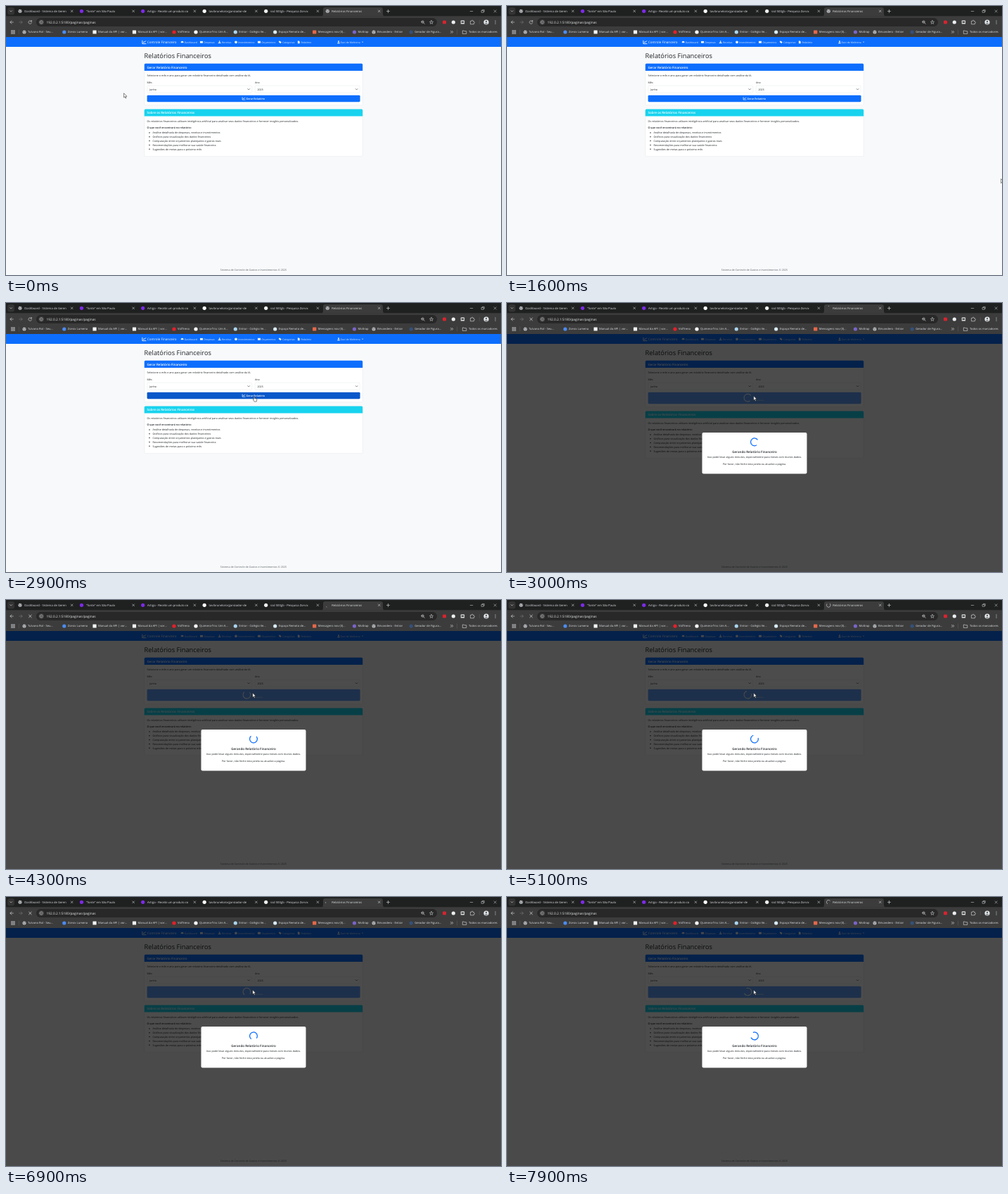
These frames come from a looping animation (704 px wide and 382 px high, 8000 ms). An HTML page:

```html
<!DOCTYPE html>
<html lang="pt-BR">
<head>
<meta charset="utf-8">
<title>Relatórios Financeiros</title>
<style>
html, body { margin: 0; width: 100%; height: 100%; overflow: hidden; background: #f8f9fa; }
svg { display: block; width: 704px; height: 382px; }
text { font-family: "Open Sans", "Noto Sans", sans-serif; text-rendering: geometricPrecision; white-space: pre; }
.line { fill: none; stroke-linecap: round; stroke-linejoin: round; }
</style>
</head>
<body>
<svg id="stage" viewBox="0 0 704 382" xmlns="http://www.w3.org/2000/svg"></svg>
<script>
const BLUE = '#0d6efd', INK = '#212529', PALE = '#dfe1e5';
const LOOP = 8000, STEP = 100, LOADING = 3000;

const text = (x, y, s, size = 3.69, fill = INK, extra = '') =>
  `<text x="${x}" y="${y}" font-size="${size}" fill="${fill}" ${extra}>${s}</text>`;
const rect = (x, y, w, h, fill, r = 0, extra = '') =>
  `<rect x="${x}" y="${y}" width="${w}" height="${h}" fill="${fill}" rx="${r}" ${extra}/>`;
const dot = (x, y, r, fill) => `<circle cx="${x}" cy="${y}" r="${r}" fill="${fill}"/>`;
const line = (d, color = PALE, w = .6, extra = '') =>
  `<path class="line" d="${d}" stroke="${color}" stroke-width="${w}" ${extra}/>`;
const group = (id, body, extra = '') => `<g id="${id}" ${extra}>${body}</g>`;
const at = (x, y, body) => `<g transform="translate(${x} ${y})">${body}</g>`;
const semibold = 'font-weight="600"';
const centered = 'text-anchor="middle"';

const globe = (x, y) => at(x, y, dot(0, 0, 2.5, '#c9cdd1') +
  line('M-1.7-1L-.4-.5L-.8.6L.2 1.7M.4-1.8L1.7-.6L1 .5', '#3c3c3c', .6));
const chart = (x, y, k = 1) => `<g transform="translate(${x} ${y}) scale(${k})">` +
  line('M-2.2-2V2H2.4M-1.2.7L-.1-.6L.7.1L2.1-1.6', '#fff', .75) + '</g>';

function mark(x, y, kind, color) {
  if (kind === 'globe') return globe(x, y);
  return kind === 'square' ? rect(x - 2.6, y - 2.6, 5.2, 5.2, color, .5) : dot(x, y, 2.6, color);
}

function tabStrip() {
  const tabs = [
    [20, 'Dashboard - Sistema de Geren', 'globe'],
    [107.5, '"fonte" em São Paulo', 'dot', '#7d2ae8'],
    [194.7, 'Artigo - Recebi um produto co', 'dot', '#7d2ae8'],
    [282.2, 'tavibrunelo/organizador-de', 'dot', '#fff'],
    [369.7, 'ssd 500gb - Pesquisa Zorvix', 'dot', '#f1f1f1'],
    [457, 'Relatórios Financeiros']
  ];
  return rect(0, 0, 704, 16, '#1f2020') + rect(2, 2, 10, 10.5, '#333', 3) +
    line('M5.7 6.6L7.2 8.1L8.7 6.6') +
    '<path d="M448 14.5Q451 14.5 451 11V5Q451 2 454 2H533Q536 2 536 5V11Q536 14.5 539 14.5Z" fill="#3c3c3c"/>' +
    tabs.map(([x, label, kind, color]) =>
      (kind ? mark(x, 7.3, kind, color) : '') + text(x + 6.3, 9, label, 4.2, PALE) +
      line(`M${x + 72.3} 5.9l2.8 2.8m0-2.8l-2.8 2.8`, PALE, .55)).join('') +
    group('tabGlobe', globe(457.3, 7.3)) +
    line('', '#b9bcc0', .8, 'id="tabSpinner"') +
    line('M541.4 7.4h4.2M543.5 5.3v4.2', PALE, .6) +
    line('M660.2 7.5h3.6M676.4 6.4h2.8v2.8h-2.8zM677.4 6.2v-.8h2.8v2.8h-.8M694 5.8l3.2 3.2m0-3.2l-3.2 3.2', PALE, .5);
}

function toolbar() {
  const ring = (x, y, r) => `M${x - r} ${y}a${r} ${r} 0 1 0 ${2 * r} 0a${r} ${r} 0 1 0 ${-2 * r} 0`;
  const star = Array.from({ length: 10 }, (_, i) => {
    const r = i % 2 ? 1.2 : 2.7, a = (i - 2.5) * Math.PI / 5;
    return `${i ? 'L' : 'M'}${(605 + r * Math.cos(a)).toFixed(2)} ${(23.2 + r * Math.sin(a)).toFixed(2)}`;
  }).join('') + 'Z';
  return rect(0, 14.3, 704, 29.7, '#3c3c3c') + rect(43, 17, 570, 12, '#282828', 6) +
    line('M10.3 23H6M8 20.9L5.9 23L8 25.1') +
    line('M18.8 23h4.3M21.1 20.9L23.2 23L21.1 25.1', '#77797b') +
    group('reload', line('M36.1 21.6A2.3 2.3 0 1 0 36.5 23.8M36.4 20.4v1.7h-1.7')) +
    group('stop', line('M32.6 21.2l3.6 3.6m0-3.6l-3.6 3.6', PALE, .7)) +
    dot(50.2, 23, 4, '#3c3c3c') + line(ring(50.2, 23, 2.2) + 'M50.2 22.9v1.1M50.2 21.8v.1', PALE, .5) +
    text(57.5, 24.8, '192.0.2.1:5180/paginas/paginas', 4.75, '#e8eaed') +
    line(ring(592.5, 22.6, 1.7) + 'M593.8 23.9l1.5 1.5M591.7 22.6h1.6', PALE, .6) + line(star, PALE, .5) +
    rect(621, 20.4, 5, 5.2, '#d8232f', 1.5) + dot(636.3, 23, 2.6, '#eceff1') +
    rect(646.7, 20.6, 5.4, 5, '#d6d8da', .7) + rect(647.7, 22, 3.4, 1.6, '#222') +
    line('M660.8 21.4h1.4q.1-1.3.9-1.3t.9 1.3h1.3v1.3q1.2.1 1.2.9t-1.2.9v1.3h-4.5z', PALE, .6) +
    line('M673.3 20.5v5', '#606264', .5) +
    dot(683, 23, 3.6, '#e3e6e8') + dot(683, 22, 1.2, '#5b6166') +
    '<path d="M680.7 25.6a2.4 2 0 0 1 4.6 0z" fill="#5b6166"/>' +
    [21, 23, 25].map(y => dot(696, y, .55, PALE)).join('');
}

function bookmarks() {
  const items = [
    [26, 'Tulvano Rol - Seu...', 'globe'],
    [82.8, 'Zorvix Lumena', 'dot', '#4b8bf0'],
    [126, 'Manual da API | vor...', 'square', '#f1f3f4'],
    [182.5, 'Manual da API | vor...', 'square', '#f1f3f4'],
    [239, 'VidTreno', 'dot', '#e3202b'],
    [270, 'Quimera-Trix: Um A...', 'dot', '#fff'],
    [326.3, 'Entrar - Colégio Ve...', 'dot', '#a9d4ee'],
    [382.7, 'Espaço Remoto de...', 'dot', '#d9ecf7'],
    [438.7, 'Mensagens nov (3)...', 'square', '#e6684a'],
    [495.5, 'Moltrap', 'dot', '#7a63c8'],
    [523, 'Brivandero - Entrar', 'globe'],
    [576.2, 'Gerador de Figura...', 'dot', '#34507a']
  ];
  let grid = '';
  for (let i = 0; i < 9; i++) grid += rect(7.3 + i % 3 * 2, 34.4 + Math.floor(i / 3) * 2, 1.3, 1.3, PALE);
  return grid + line('M18.3 34v6', '#606264', .5) +
    items.map(([x, label, kind, color]) =>
      mark(x, 37, kind, color) + text(x + 5, 38.4, label, 4.1, PALE)).join('') +
    line('M632.4 35.4l1.4 1.5l-1.4 1.5M634.4 35.4l1.4 1.5l-1.4 1.5') +
    line('M641.5 34v6', '#606264', .5) +
    line('M649.3 39v-4h2l.7.8h2.8v3.2z', PALE, .6) +
    text(658, 38.4, 'Todos os marcadores', 4.1, PALE);
}

function navbar() {
  const icons = [
    'M-1.8 1a1.9 1.9 0 1 1 3.6 0z', 'M-2-1.4h4v2.8h-4z', 'M-2 .6h4v1h-4zM-.5-2h1v1.4h1l-1.5 1.4l-1.5-1.4h1z',
    'M-1.9 0a1.9 1.9 0 1 0 3.8 0a1.9 1.9 0 1 0-3.8 0', 'M-2-1.5h4v3h-4z', 'M-2-1.6h1.8l2 1.9l-1.6 1.6l-2.2-2z',
    'M-1.4-1.9h1.8l1 1v2.8h-2.8z'
  ];
  const items = [
    [250.6, 'Dashboard'], [278, 'Despesas'], [303.7, 'Receitas'], [327, 'Investimentos'],
    [360, 'Orçamentos'], [390, 'Categorias'], [416.3, 'Relatório']
  ];
  return rect(0, 44, 704, 14, BLUE) + chart(196.3, 51.4, 1.1) +
    text(200.8, 53.1, 'Controle Financeiro', 4.6, '#fff') +
    items.map(([x, label], i) => at(x, 51.3, `<path d="${icons[i]}" fill="#e8f1ff"/>`) +
      text(x + 3.2, 52.7, label, 3.52, '#dbe9ff')).join('') +
    dot(473, 50.2, 1, '#e8f1ff') + '<path d="M471.2 53.2a1.8 1.8 0 0 1 3.6 0z" fill="#e8f1ff"/>' +
    text(475.5, 52.7, 'Davi de Moltrena', 3.55, '#dbe9ff') +
    '<path d="M506 50.8h2.2l-1.1 1.1z" fill="#dbe9ff"/>';
}

const select = (x, value) => rect(x, 113.2, 149, 10.2, '#fff', 1.5, 'stroke="#dee2e6" stroke-width=".4"') +
  text(x + 3.2, 119.6, value) + line(`M${x + 143} 117.6l1.4 1.4l1.4-1.4`, '#343a40', .6);

function formCard() {
  return rect(196.8, 82, 310.4, 58.8, '#fff', 1.5, 'id="formBody" stroke="#e1e3e5" stroke-width=".4"') +
    '<path d="M196.8 92V83.4q0-1.6 1.6-1.6h107.2h200q1.6 0 1.6 1.6V92z" fill="#0d6efd"/>' +
    text(200.5, 88.6, 'Gerar Relatório Financeiro', 4.5, '#fff', semibold) +
    text(200.5, 100.4, 'Selecione o mês e ano para gerar um relatório financeiro detalhado com análise da IA.') +
    text(200.5, 109.5, 'Mês') + text(354, 109.5, 'Ano') + select(200.8, 'Junho') + select(354.2, '2025') +
    rect(200.6, 126.8, 303, 9.4, BLUE, 1.4, 'id="button"') +
    group('buttonLabel', chart(338, 131.4, .85) + text(341.6, 132.9, 'Gerar Relatório', 3.6, '#fff', semibold)) +
    group('busyLabel', at(342.5, 134.6, spinner('#fff', 1)) + text(350.2, 139, 'Processando...', 2.4, '#fff'));
}

function aboutCard() {
  const topics = [
    'Análise detalhada de despesas, receitas e investimentos',
    'Gráficos para visualização dos dados financeiros',
    'Comparação entre orçamentos planejados e gastos reais',
    'Recomendações para melhorar sua saúde financeira',
    'Sugestões de metas para o próximo mês'
  ];
  return rect(196.8, 146.5, 310.4, 67, '#fff', 1.5, 'stroke="#e1e3e5" stroke-width=".4"') +
    '<path d="M196.8 156.5V148q0-1.6 1.6-1.6h307.2q1.6 0 1.6 1.6V156.5z" fill="#17d3ee"/>' +
    text(200.5, 153.1, 'Sobre os Relatórios Financeiros', 4.5, '#f4fdff', semibold) +
    text(200.5, 164.5, 'Os relatórios financeiros utilizam inteligência artificial para analisar seus dados financeiros e fornecer insights personalizados.') +
    text(200.5, 173.5, 'O que você encontrará no relatório:', 3.69, INK, semibold) +
    topics.map((s, i) => dot(204, 180 + i * 5.8, .75, INK) + text(208.4, 181.3 + i * 5.8, s)).join('');
}

// Three quarters of a ring; the gap faces right at rest.
function spinner(color, width) {
  const r = 5.4, c = (r * Math.SQRT1_2).toFixed(2);
  return `<path class="spin" d="M${c} ${c}A${r} ${r} 0 1 1 ${c} -${c}" fill="none" stroke="${color}" stroke-width="${width}"/>`;
}

function modal() {
  return rect(0, 44, 704, 338, '#000', 0, 'opacity=".7"') + rect(277.5, 184, 149, 58.5, '#fff', 2) +
    at(352, 197.4, spinner(BLUE, 1.25)) +
    text(352, 212.7, 'Gerando Relatório Financeiro', 4.5, INK, semibold + centered.padStart(24)) +
    text(352, 220.1, 'Isso pode levar alguns minutos, especialmente para meses com muitos dados.', 3.69, INK, centered) +
    text(352, 229.7, 'Por favor, não feche esta janela ou atualize a página.', 3.69, INK, centered);
}

const outline = 'fill="#fff" stroke="#111" stroke-width=".5" stroke-linejoin="round"';
const stage = document.getElementById('stage');
stage.innerHTML = rect(0, 0, 704, 382, '#f8f9fa') + navbar() +
  text(196.6, 73.6, 'Relatórios Financeiros', 9.3, INK, 'font-weight="500"') +
  formCard() + group('about', aboutCard()) +
  text(352, 376.4, 'Sistema de Controle de Gastos e Investimentos © 2025', 3.69, '#5c636a', centered) +
  group('modal', modal()) + tabStrip() + toolbar() + bookmarks() +
  group('arrow', `<path d="M0 0V6.1L1.4 4.9L2.4 7.2L3.4 6.8L2.4 4.5H4.3Z" ${outline}/>`) +
  group('hand', `<path d="M-.6.5Q0-.4.6.5V3L3.2 3.5Q4 3.8 3.9 4.6L3.2 7.5H.2L-1.6 4.9Q-1.6 4-.6 4.6Z" ${outline}/>`);

const el = id => document.getElementById(id);
const show = (id, on) => el(id).setAttribute('visibility', on ? 'visible' : 'hidden');
const spins = stage.querySelectorAll('.spin');

// Pointer path: time, x, y
const path = [
  [0, 167.6, 123.8], [1099, 167.6, 123.8], [1100, 622.5, 241.5], [1200, 622.5, 241.5], [1400, 684, 251],
  [1600, 702.6, 245.5], [1700, 702.6, 244], [1900, 600, 228], [2100, 394.5, 179.5],
  [2300, 366, 152], [2500, 353, 132.5], [2999, 353, 132.5], [3000, 350.8, 132], [LOOP, 350.8, 132]
];
function pointer(t) {
  const i = Math.max(1, path.findIndex(p => p[0] >= t));
  const [a, b] = [path[i - 1], path[i]], k = (t - a[0]) / (b[0] - a[0]);
  return [a[1] + (b[1] - a[1]) * k, a[2] + (b[2] - a[2]) * k];
}

// Tab throbber: an arc that grows and shrinks while it turns.
function throbber(ms) {
  const half = 666, max = 270, p = ms % half / half, ease = p * p * (3 - 2 * p);
  const shrinking = Math.floor(ms / half) % 2;
  const turn = 270 + ms / 1568 * 360 + Math.floor(ms / half / 2) * max;
  const from = turn + (shrinking ? max * ease : 0);
  const sweep = Math.max(8, max * (shrinking ? 1 - ease : ease));
  const point = deg => {
    const a = deg * Math.PI / 180;
    return `${(457.3 + 2.9 * Math.cos(a)).toFixed(2)} ${(7.3 + 2.9 * Math.sin(a)).toFixed(2)}`;
  };
  return `M${point(from)}A2.9 2.9 0 ${sweep > 180 ? 1 : 0} 1 ${point(from + sweep)}`;
}

function draw(t) {
  const busy = t >= LOADING, hover = t >= 2500 && !busy, ms = Math.max(0, t - LOADING);
  for (const id of ['modal', 'stop', 'tabSpinner', 'busyLabel']) show(id, busy);
  for (const id of ['reload', 'tabGlobe', 'buttonLabel']) show(id, !busy);
  show('arrow', !hover);
  show('hand', hover);
  const [x, y] = pointer(t);
  for (const id of ['arrow', 'hand']) el(id).setAttribute('transform', `translate(${x} ${y})`);

  el('button').setAttribute('fill', busy ? '#62a1fe' : t >= 2900 ? '#0a58ca' : hover ? '#0b5ed7' : BLUE);
  el('button').setAttribute('height', busy ? 16.4 : 9.4);
  el('formBody').setAttribute('height', busy ? 65.8 : 58.8);
  el('about').setAttribute('transform', `translate(0 ${busy ? 7 : 0})`);
  spins.forEach(s => s.setAttribute('transform', `rotate(${10 + ms / 750 * 360})`));
  el('tabSpinner').setAttribute('d', throbber(ms));
}

const start = performance.now();
function tick() {
  const t = (performance.now() - start) % LOOP;
  draw(Math.floor(t / STEP) * STEP);
  requestAnimationFrame(tick);
}
tick();
</script>
</body>
</html>
```
